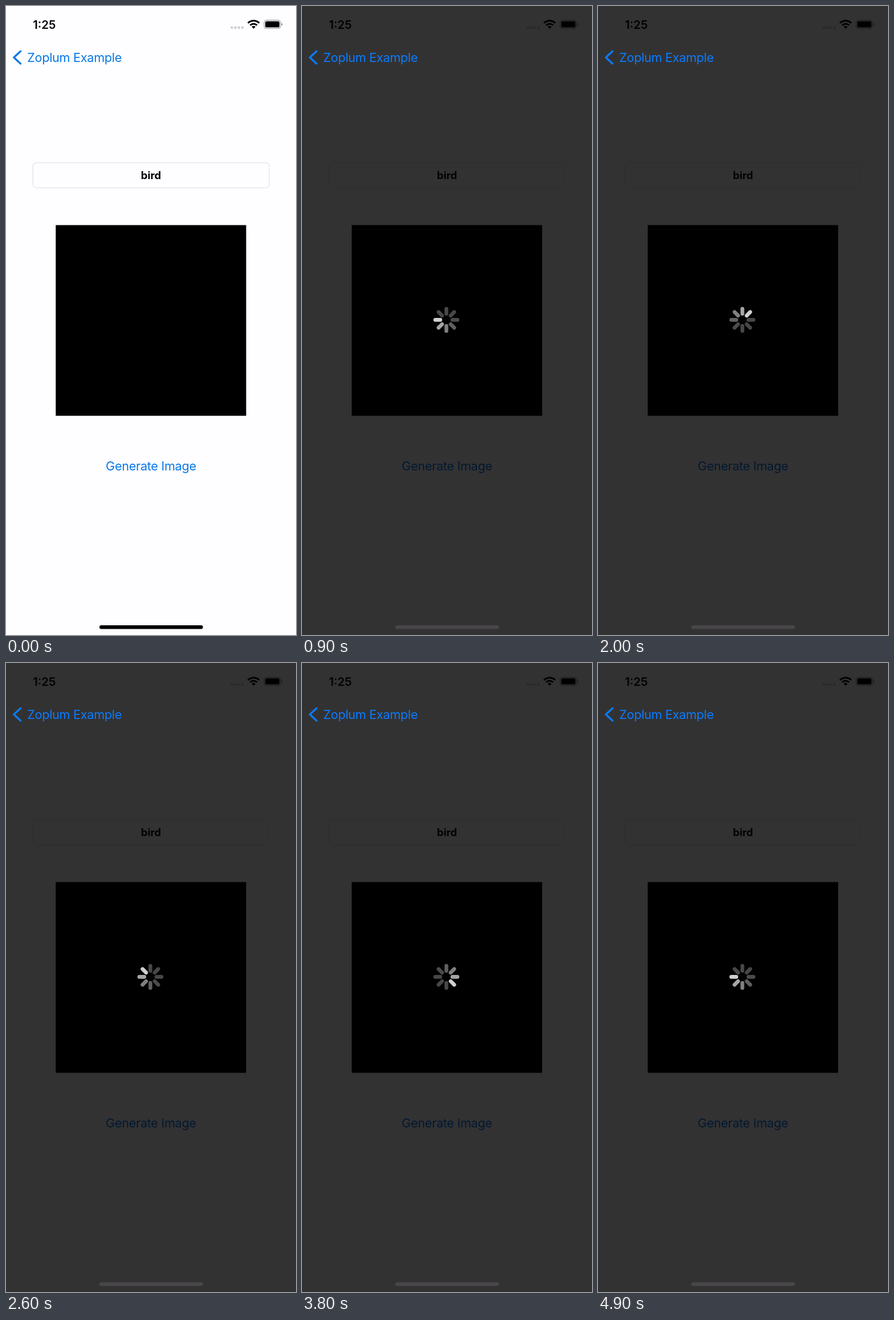
Animation of 509x1101 px, one loop 5000 ms. Source, as an HTML page:

```html
<!DOCTYPE html>
<html lang="en">
<head>
<meta charset="utf-8">
<title>Image generator</title>
<style>
  html, body { margin: 0; width: 100%; height: 100%; overflow: hidden; background: #fefdff; }
  svg { display: block; width: 100%; height: 100%; }
  text { font-family: Inter, Roboto, sans-serif; }
  .link { font-size: 21.7px; letter-spacing: -.32px; }
</style>
</head>
<body>
<svg viewBox="0 0 509 1101">
  <rect width="509" height="1101" fill="#fefdff"/>

  <rect x="47.3" y="274.3" width="414.8" height="44" rx="6.5" fill="none" stroke="#e3e2e5" stroke-width="1.2"/>
  <text x="254.5" y="302.6" font-size="18.5" font-weight="700" text-anchor="middle">bird</text>
  <rect x="87.3" y="383.5" width="334.2" height="333.8"/>
  <text id="button" class="link" x="254.4" y="813" text-anchor="middle">Generate Image</text>

  <rect id="shade" width="509" height="1101" fill="#000" fill-opacity=".8"/>

  <text x="47.3" y="40" font-size="20.3" font-weight="600">1:25</text>
  <g id="dots" fill-opacity=".2"></g>
  <g id="wifi" fill="none" stroke="#000"></g>
  <rect x="453.1" y="24.9" width="28.8" height="14.6" rx="4.4" fill="none" stroke="#000" stroke-opacity=".4" stroke-width="1.2"/>
  <rect x="455" y="26.8" width="25" height="10.8" rx="2.7"/>
  <path d="M483.4 29.8q1.9 .8 1.9 2.4t-1.9 2.4z" fill-opacity=".45"/>

  <g id="nav">
    <path d="M25.6 79.2L13.8 90L25.6 101" fill="none" stroke="currentColor" stroke-width="3.2" stroke-linecap="round" stroke-linejoin="round"/>
    <text class="link" x="37.2" y="98" fill="currentColor">Zoplum Example</text>
  </g>

  <g id="spinner" transform="translate(253.4 549.4)" stroke-width="6.6" stroke-linecap="round"></g>
  <rect id="home" x="164" y="1084" width="181.6" height="6.5" rx="3.25"/>
</svg>
<script>
const LOOP = 5000, PRESS = 700, LOAD = 900, STEP = 100;
const SPOKES = 8, FIRST = 6;
const TRAIL = [208, 166, 128, 96, 75];
const REST = 71;

const $ = id => document.getElementById(id);

function add(parent, tag, attrs) {
  const el = document.createElementNS(parent.namespaceURI, tag);
  for (const key in attrs) el.setAttribute(key, attrs[key]);
  return parent.appendChild(el);
}

for (let i = 0; i < 4; i++) add($('dots'), 'circle', { cx: 396.4 + i * 6.2, cy: 37.7, r: 2.2 });

// Radius and stroke width of each band of the signal fan.
for (const [r, w] of [[2.4, 4.8], [8.5, 3], [14, 3.1]]) {
  const d = r * Math.SQRT1_2;
  add($('wifi'), 'path', {
    d: `M${434.6 - d} ${39.7 - d}A${r} ${r} 0 0 1 ${434.6 + d} ${39.7 - d}`,
    'stroke-width': w
  });
}

const spokes = Array.from({ length: SPOKES }, (_, i) =>
  add($('spinner'), 'line', { y1: -10.7, y2: -19.4, transform: `rotate(${i * 360 / SPOKES})` }));

function draw(t) {
  const loading = t >= LOAD;
  $('shade').style.display = $('spinner').style.display = loading ? '' : 'none';
  $('nav').style.color = loading ? '#0a7cff' : '#0879e6';
  $('home').style.fill = loading ? '#484648' : '#000';
  $('button').style.fill = t >= PRESS && !loading ? '#3396e9' : '#0879e6';
  if (!loading) return;
  const head = FIRST + Math.floor((t - LOAD) / STEP);
  spokes.forEach((spoke, i) => {
    const age = (head - i + SPOKES) % SPOKES;
    const v = TRAIL[age] ?? REST;
    spoke.style.stroke = `rgb(${v},${v},${v + 1})`;
  });
}

const start = performance.now();
function tick() {
  draw((performance.now() - start) % LOOP);
  requestAnimationFrame(tick);
}
tick();
</script>
</body>
</html>
```
